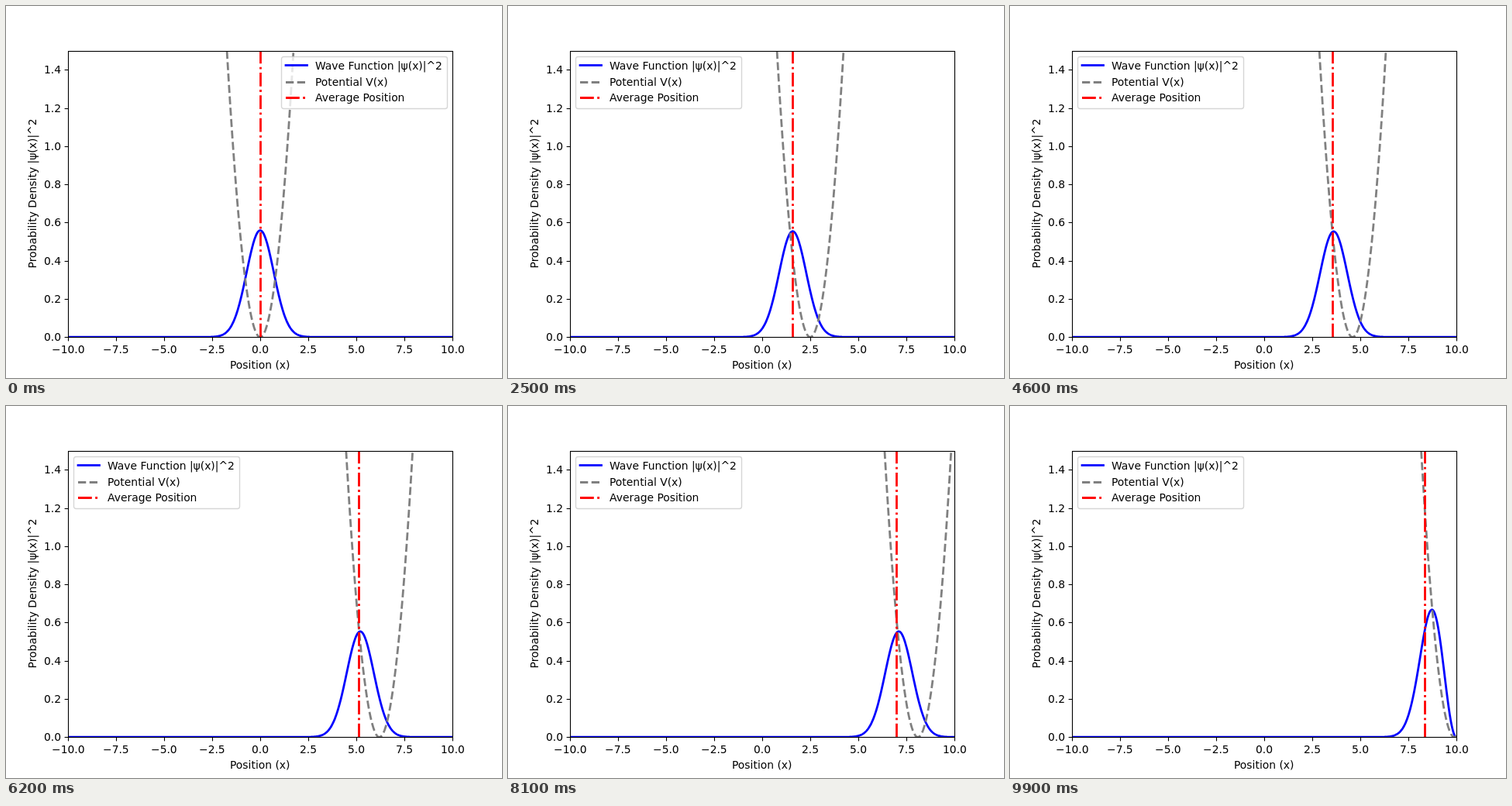
Write an HTML page with a canvas that moves like this. It is 640 px wide and 480 px high and loops after 10000 ms.

```html
<!DOCTYPE html>
<html lang="en">
<head>
<meta charset="utf-8">
<title>Wave packet in a moving well</title>
<style>
html, body { margin: 0; width: 100%; height: 100%; overflow: hidden; background: #fff; }
canvas { display: block; width: 640px; height: 480px; }
</style>
</head>
<body>
<canvas id="plot" width="640" height="480"></canvas>
<script>
const ctx = document.getElementById('plot').getContext('2d');
const FRAMES = 100, FRAME_MS = 100;
const LINE = 2.778, THIN = 1.111;
const DASH = [10.28, 4.44], DASHDOT = [17.78, 4.44, 2.78, 4.44];
const BLUE = '#0000ff', GRAY = '#808080', RED = '#ff0000';

const px = x => 328 + 24.8 * x;
const py = y => 427.2 - 246.4 * y;
const snap = v => Math.floor(v + 0.5) + 0.5;

// Imaginary-time evolution in a drifting harmonic well (Crank-Nicolson, walls at x = -10 and 10).
const N = 1000, DX = 20 / (N - 1), DT = 0.01, SUBSTEPS = 10;
const xs = Float64Array.from({ length: N }, (_, i) => -10 + i * DX);
const potential = (x, c) => 0.5 * (x - c) ** 2;

function step(psi, c) {
  const r = DT / (4 * DX * DX);
  const norm = Math.sqrt(psi.reduce((s, p) => s + p * p, 0) * DX);
  for (let i = 0; i < N; i++) psi[i] /= norm;
  const up = new Float64Array(N), rhs = new Float64Array(N);
  for (let i = 1; i < N - 1; i++) {
    const d = 2 * r + DT / 2 * potential(xs[i], c);
    const b = (1 - d) * psi[i] + r * (psi[i - 1] + psi[i + 1]);
    const m = 1 + d + r * up[i - 1];
    up[i] = -r / m;
    rhs[i] = (b + r * rhs[i - 1]) / m;
  }
  psi[N - 1] = psi[0] = 0;
  for (let i = N - 2; i > 0; i--) psi[i] = rhs[i] - up[i] * psi[i + 1];
}

function simulate() {
  const psi = xs.map(x => Math.exp(-x * x / 2));
  const states = [];
  for (let k = 0; k <= (FRAMES - 1) * SUBSTEPS; k++) {
    step(psi, k * DT);
    if (k % SUBSTEPS === 0) {
      const density = psi.map(p => p * p);
      const mean = density.reduce((s, d, i) => s + d * xs[i], 0) * DX;
      states.push({ center: k * DT, density, mean });
    }
  }
  return states;
}

function stroke(points, color, width, dash = [], cap = 'butt') {
  ctx.beginPath();
  for (const [x, y] of points) ctx.lineTo(x, y);
  ctx.strokeStyle = color;
  ctx.lineWidth = width;
  ctx.lineCap = cap;
  ctx.lineJoin = 'round';
  ctx.setLineDash(dash);
  ctx.stroke();
}

// align: 0 = left, 0.5 = centre, 1 = right
function text(str, x, y, align = 0) {
  ctx.fillStyle = '#000';
  ctx.fillText(str, Math.round(x - align * ctx.measureText(str).width), y);
}

function drawCurves({ center, density, mean }) {
  ctx.save();
  ctx.beginPath();
  ctx.rect(80, 58, 496, 369);
  ctx.clip();
  stroke(Array.from(density, (d, i) => [px(xs[i]), py(d)]), BLUE, LINE, [], 'square');

  // The well enters at the top edge of the stage, which fixes its dash phase.
  const reach = Math.sqrt(2 * 428.2 / 246.4);
  const well = [];
  const last = Math.min(10, center + reach);
  for (let x = center - reach; x < last; x += DX) well.push([px(x), py(potential(x, center))]);
  stroke(well, GRAY, LINE, DASH);

  const mx = snap(px(mean));
  stroke([[mx, 427.5], [mx, 58]], RED, LINE, DASHDOT);
  ctx.restore();
}

function drawAxes() {
  for (let i = 0; i <= 8; i++) {
    const v = -10 + 2.5 * i, x = px(v);
    stroke([[snap(x), 427.5], [snap(x), 432.4]], '#000', THIN);
    text(v.toFixed(1).replace('-', '\u2212'), x, 448, 0.5);
  }
  for (let i = 0; i <= 7; i++) {
    const v = 0.2 * i, y = py(v);
    stroke([[80.5, snap(y)], [75.6, snap(y)]], '#000', THIN);
    text(v.toFixed(1), 70.6, Math.round(y + 5), 1);
  }
  ctx.strokeStyle = '#000';
  ctx.lineWidth = THIN;
  ctx.lineJoin = 'miter';
  ctx.setLineDash([]);
  ctx.strokeRect(80.5, 58.5, 496, 369);

  text('Position (x)', 328, 468, 0.5);
  ctx.save();
  ctx.translate(39, 242.4);
  ctx.rotate(-Math.PI / 2);
  text('Probability Density |ψ(x)|^2', 0, 0, 0.5);
  ctx.restore();
}

// The legend settles where it covers the fewest curve points.
function legendPlace(frame) {
  if (frame === 0) return [355, 65];
  return frame < 7 ? [87, 209] : [87, 65];
}

function drawLegend(frame) {
  const [x, y] = legendPlace(frame);
  ctx.save();
  ctx.translate(x, y);
  ctx.globalAlpha = 0.8;
  ctx.beginPath();
  ctx.roundRect(0.5, 0.5, 214, 67, 2.8);
  ctx.fillStyle = '#fff';
  ctx.fill();
  ctx.strokeStyle = '#ccc';
  ctx.lineWidth = 1.39;
  ctx.setLineDash([]);
  ctx.stroke();
  ctx.globalAlpha = 1;
  const row = (label, ly, ty, color, dash, cap) => {
    stroke([[6, ly], [33.5, ly]], color, LINE, dash, cap);
    text(label, 44, ty);
  };
  row('Wave Function |ψ(x)|^2', 11.5, 17, BLUE, [], 'square');
  row('Potential V(x)', 33.5, 38, GRAY, DASH);
  row('Average Position', 53.5, 58, RED, DASHDOT);
  ctx.restore();
}

const states = simulate();

function draw(ms) {
  const frame = Math.floor(ms / FRAME_MS) % FRAMES;
  ctx.fillStyle = '#fff';
  ctx.fillRect(0, 0, 640, 480);
  ctx.font = '13.889px "DejaVu Sans", sans-serif';
  drawCurves(states[frame]);
  drawAxes();
  drawLegend(frame);
}

const start = performance.now();
function tick() {
  draw(performance.now() - start);
  requestAnimationFrame(tick);
}
tick();
</script>
</body>
</html>
```
